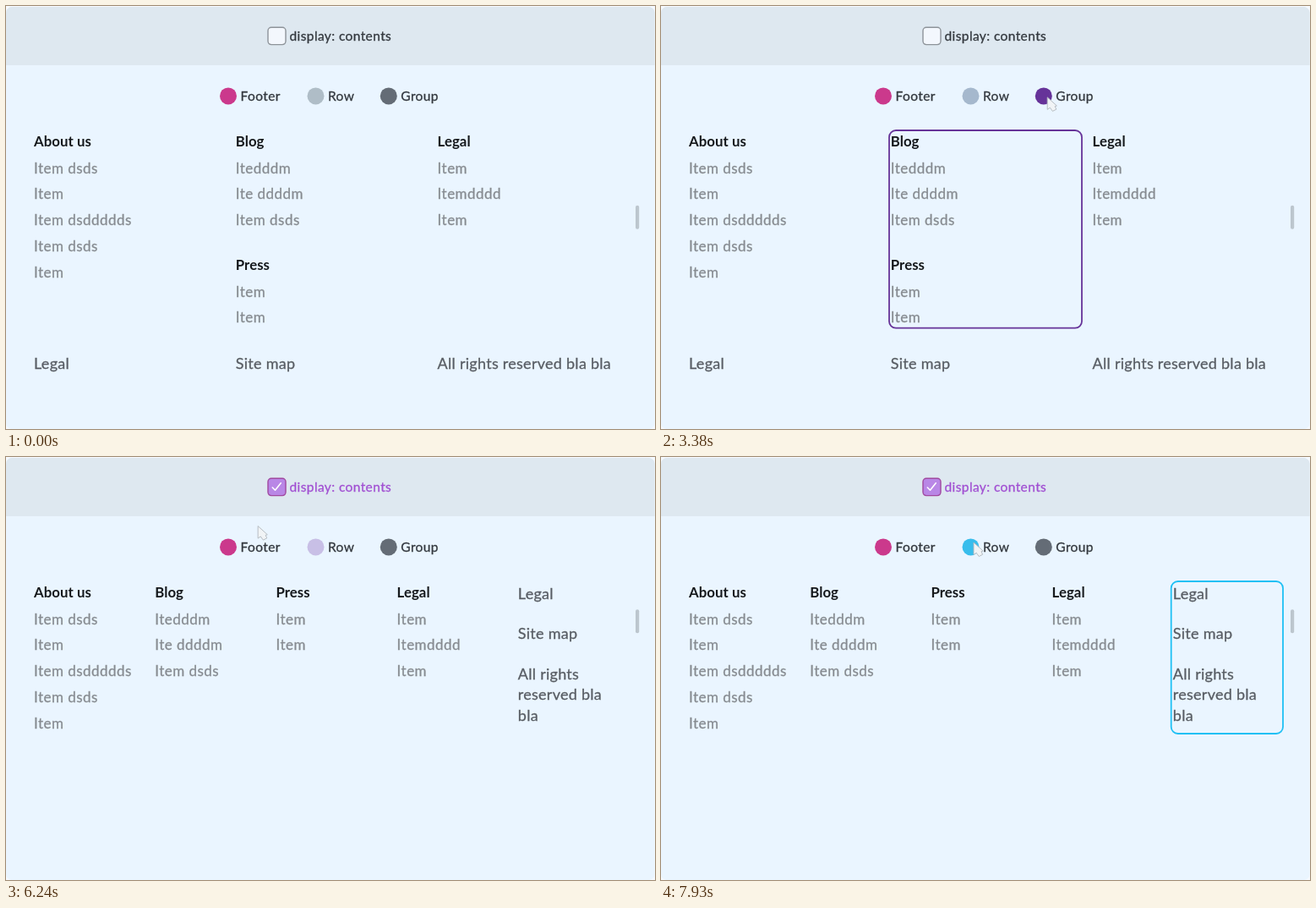
Recreate the animation shown at these times as an HTML page. Size 768x500 px, loop 8000 ms.

```html
<!DOCTYPE html>
<html lang="en">
<head>
<meta charset="utf-8">
<title>display: contents</title>
<style>
  html, body { margin: 0; width: 100%; height: 100%; overflow: hidden; background: #f6faff; }
  svg { display: block; width: 768px; height: 500px; font-family: Lato, "Open Sans", sans-serif; }
  text { fill: currentColor; stroke: currentColor; stroke-width: .3px; }
  .label { font-size: 15.5px; letter-spacing: .4px; color: #33383e; }
  .head { font-size: 16.8px; font-weight: 700; letter-spacing: .05px; color: #16191c; stroke-width: 0; }
  .item { font-size: 17px; letter-spacing: .48px; color: #868b90; }
  .foot { font-size: 18px; letter-spacing: .27px; color: #585d63; }
  .frame { fill: none; stroke-width: 1.8; }
</style>
</head>
<body>
<svg id="stage" viewBox="0 0 768 500"></svg>
<script>
const LOOP = 8000, STEP = 130;
const stage = document.getElementById('stage');

function set(el, attrs) {
  for (const k in attrs) el.setAttribute(k, attrs[k]);
  return el;
}
function add(tag, attrs, parent = stage) {
  const el = set(document.createElementNS('http://www.w3.org/2000/svg', tag), attrs);
  parent.appendChild(el);
  return el;
}
function text(str, x, y, cls, parent) {
  const el = add('text', { x, y, class: cls }, parent);
  el.textContent = str;
  return el;
}
function show(el, on) {
  el.style.display = on ? '' : 'none';
}
function place(el, x, y) {
  set(el, { transform: `translate(${x} ${y})` });
}

// Page
add('rect', { x: 0, y: 1, width: 767.5, height: 499, rx: 7, fill: '#eaf5ff' });
add('path', { d: 'M0 70V8a7 7 0 0 1 7-7H760.5a7 7 0 0 1 7 7V70z', fill: '#dee8f0' });

// Checkbox
const box = add('rect', { x: 310, y: 25.2, width: 21, height: 20.4, rx: 4, 'stroke-width': 1.4 });
const tick = add('path', {
  d: 'M315.3 36l3.2 3.2 6.8-8.4', fill: 'none', stroke: '#fff', 'stroke-width': 1.6,
  'stroke-linecap': 'round', 'stroke-linejoin': 'round'
});
const boxLabel = text('display: contents', 335.5, 41, 'label');

// Legend
const [footDot, rowDot, groupDot] = [['Footer', 263], ['Row', 366.5], ['Group', 452.8]].map(([name, x]) => {
  text(name, x + 14.5, 112.3, 'label');
  return add('circle', { cx: x, cy: 106.4, r: 10 });
});

// Link blocks
function block(title, items) {
  const g = add('g', {});
  text(title, 0, 166, 'head', g);
  items.forEach((s, i) => text(s, 0, 197.6 + i * 30.8, 'item', g));
  return g;
}
const about = block('About us', ['Item dsds', 'Item', 'Item dsddddds', 'Item dsds', 'Item']);
const blog = block('Blog', ['Itedddm', 'Ite ddddm', 'Item dsds']);
const press = block('Press', ['Item', 'Item']);
const legal = block('Legal', ['Item', 'Itemdddd', 'Item']);
place(about, 33, 0);

const lines = ['Legal', 'Site map', 'All rights reserved bla bla'];
const wide = add('g', {});
lines.forEach((s, i) => text(s, 33 + i * 238.8, 429, 'foot', wide));
const narrow = add('g', {});
text(lines[0], 0, 168, 'foot', narrow);
text(lines[1], 0, 215.2, 'foot', narrow);
['All rights', 'reserved bla', 'bla'].forEach((s, i) => text(s, 0, 263 + i * 24.4, 'foot', narrow));

const bar = add('rect', { x: 745, width: 4.2, height: 28, rx: 2, fill: '#bcc6ce' });

// Highlight frames
function outline(x, y, right, bottom, rx, stroke) {
  return add('rect', { class: 'frame', x, y, width: right - x, height: bottom - y, rx, stroke });
}
const PINK = '#ec1a93', SKY = '#1fc0f4', PURPLE = '#663399';
const footFrame = outline(23, 139, 744, 445, 15, PINK);
const rowFrame = outline(31, 147, 736, 380.7, 8, SKY);
const rowFrame2 = outline(31, 407.7, 736, 437.3, 8, SKY);
const groupFrame = outline(270, 147, 498, 380.7, 8, PURPLE);

// Pointer
const arrow = add('path', {
  d: 'M0 0V14.5l3.2-2.2 3 4.2 4.4-2.2-1.6-3.6 2.2-.6z',
  fill: '#f1f4f6', stroke: '#b0b7bd', 'stroke-width': .9, 'stroke-linejoin': 'round'
});
const hand = add('path', {
  d: 'M-2 1a2 2 0 0 1 4 0v5l7 2q2 1 1.5 4l-1 5h-8l-6-7q1-2 4 0z',
  fill: '#fff', stroke: '#c9b3c6', 'stroke-width': .7, 'stroke-linejoin': 'round'
});

const path = [
  [0, 318, 150], [650, 286, 109], [1820, 286, 109], [2730, 388, 107], [2990, 388, 107],
  [3510, 470, 108], [4290, 470, 108], [4420, 435.5, 86.5], [4940, 320, 29], [5590, 320, 29],
  [6630, 288, 106], [7020, 288, 106], [7930, 370, 101], [LOOP, 370, 101]
];
const smooth = p => p * p * (3 - 2 * p);
function pointer(t) {
  const i = path.findIndex(k => k[0] > t);
  const [t0, x0, y0] = path[i - 1], [t1, x1, y1] = path[i];
  const p = smooth((t - t0) / (t1 - t0));
  return [x0 + (x1 - x0) * p, y0 + (y1 - y0) * p];
}

function hover(t) {
  if (t >= 390 && t < 2210 || t >= 6370 && t < 7540) return 'footer';
  if (t >= 2340 && t < 3380 || t >= 7670) return 'row';
  if (t >= 3380 && t < 4420) return 'group';
  return '';
}

function draw(time) {
  const t = Math.floor(time / STEP) * STEP;
  const flat = t >= 5200, over = hover(t);
  const onBox = t >= 4810 && t < 5850;

  set(box, flat
    ? { fill: onBox ? '#b8448f' : '#b987e6', stroke: onBox ? '#a4508f' : '#a0489f' }
    : { fill: '#f3f7fd', stroke: '#8d9399' });
  show(tick, flat);
  boxLabel.style.color = flat ? (onBox ? '#a167cf' : '#a14fd2') : '';

  const rowIdle = flat ? '#c8bfe6' : t < 390 ? '#afbdc7' : '#a5b8cd';
  set(footDot, { fill: over === 'footer' ? '#cf2986' : '#cb398c' });
  set(rowDot, { fill: over === 'row' ? '#38bdec' : rowIdle });
  set(groupDot, {
    fill: over === 'group' ? PURPLE : over === 'footer' ? (flat ? '#83396c' : '#62667a') : '#646c76'
  });

  // Five columns settle to a tighter gap
  const settle = smooth(Math.min(1, Math.max(0, (t - 5460) / 520)));
  const col = 146.2 - 3 * settle;
  place(blog, flat ? 33 + col : 271.8, 0);
  place(press, flat ? 33 + col * 2 : 271.8, flat ? 0 : 146);
  place(legal, flat ? 33 + col * 3 : 510.6, 0);
  place(narrow, 33 + col * 4, 0);
  show(wide, !flat);
  show(narrow, flat);
  set(bar, { y: flat ? 180.3 : 235.7 });

  show(footFrame, over === 'footer');
  set(footFrame, { height: flat ? 195.7 : 306 });
  show(rowFrame, over === 'row');
  set(rowFrame, flat ? { x: 603.7, width: 132.3, height: 180 } : { x: 31, width: 705, height: 233.7 });
  show(rowFrame2, over === 'row' && !flat);
  show(groupFrame, over === 'group');

  const [x, y] = pointer(t);
  place(arrow, x, y);
  place(hand, x, y);
  show(arrow, t >= 130 && !onBox);
  show(hand, onBox);
}

function tickFrame() {
  draw(performance.now() % LOOP);
  requestAnimationFrame(tickFrame);
}
tickFrame();
</script>
</body>
</html>
```
